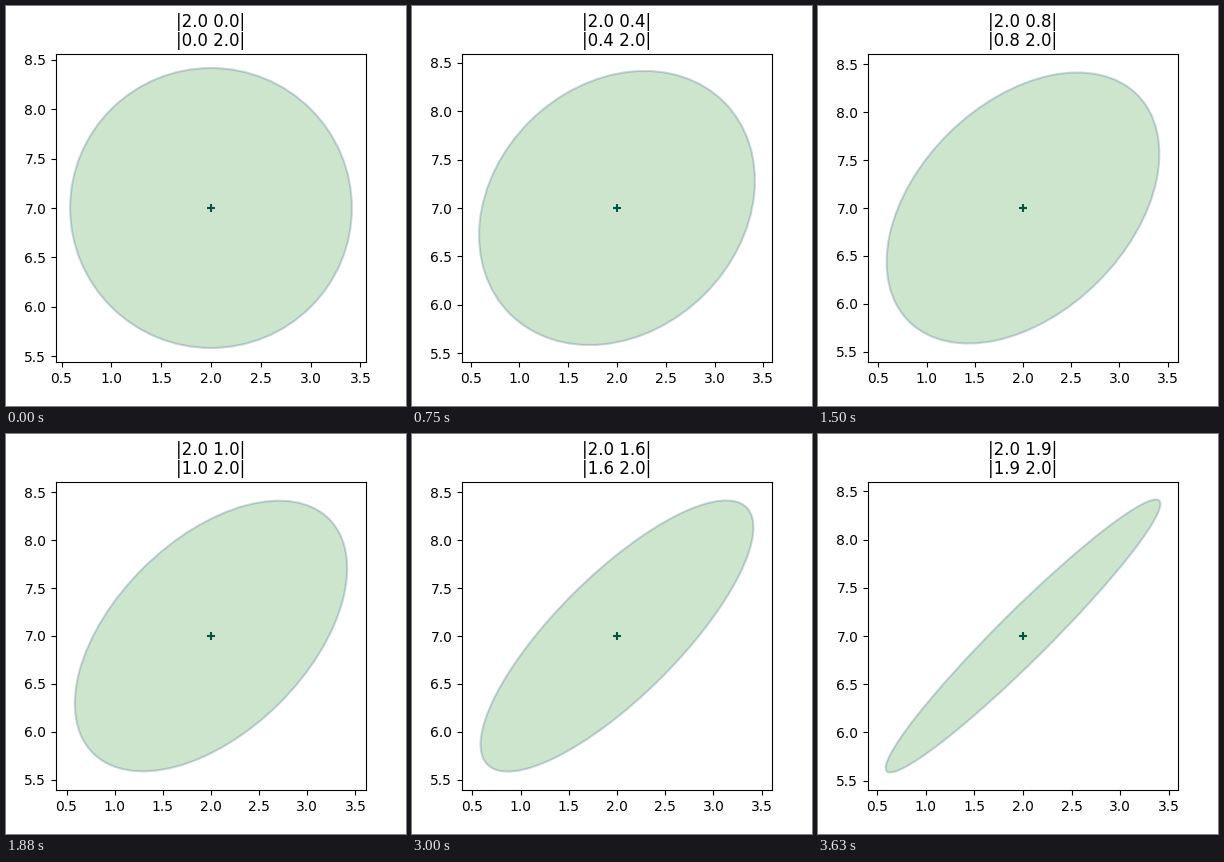
Animation of 400x400 px, one loop 3.76 s. Source, as a matplotlib script:

```python
import numpy as np
import matplotlib.pyplot as plt
from matplotlib.animation import FuncAnimation
from matplotlib.patches import Ellipse
from matplotlib.path import Path

LOOP_MS = 3760
TICK_MS = 20
STEP_MS = 125
STEPS = 30
CENTER = np.array([2.0, 7.0])
VARIANCE = 2.0
MARGIN = 1.1

fig, ax = plt.subplots(figsize=(4, 4), dpi=100)

ellipse = Ellipse(CENTER, 1, 1, angle=45, facecolor=(0, 0.5, 0, 0.2),
                  edgecolor=(0, 0.2, 0.4, 0.2), linewidth=1.5)
ax.add_patch(ellipse)
ax.plot(*CENTER, "+", color="#00553f", markersize=6, markeredgewidth=1.5)


def half_extent(a, b):
    """Reach of the Bezier control points of an ellipse turned by 45 degrees."""
    u, v = Path.unit_circle().vertices.T
    return np.max(a * u - b * v) / np.sqrt(2)


def update(tick):
    # The covariance grows in hard steps, sampled mid-tick; the last one holds.
    step = min((tick * TICK_MS + TICK_MS // 2) // STEP_MS, STEPS - 1)
    cov = VARIANCE * step / STEPS
    a, b = np.sqrt(VARIANCE + cov), np.sqrt(VARIANCE - cov)
    ellipse.set(width=2 * a, height=2 * b)

    reach = MARGIN * half_extent(a, b)
    ax.set_xlim(CENTER[0] - reach, CENTER[0] + reach)
    ax.set_ylim(CENTER[1] - reach, CENTER[1] + reach)
    ax.set_title(f"|{VARIANCE:.1f} {cov:.1f}|\n|{cov:.1f} {VARIANCE:.1f}|",
                 linespacing=1.07)
    return ()


anim = FuncAnimation(fig, update, frames=LOOP_MS // TICK_MS,
                     init_func=lambda: update(0), interval=TICK_MS,
                     repeat=True, repeat_delay=0)
plt.show()
```
